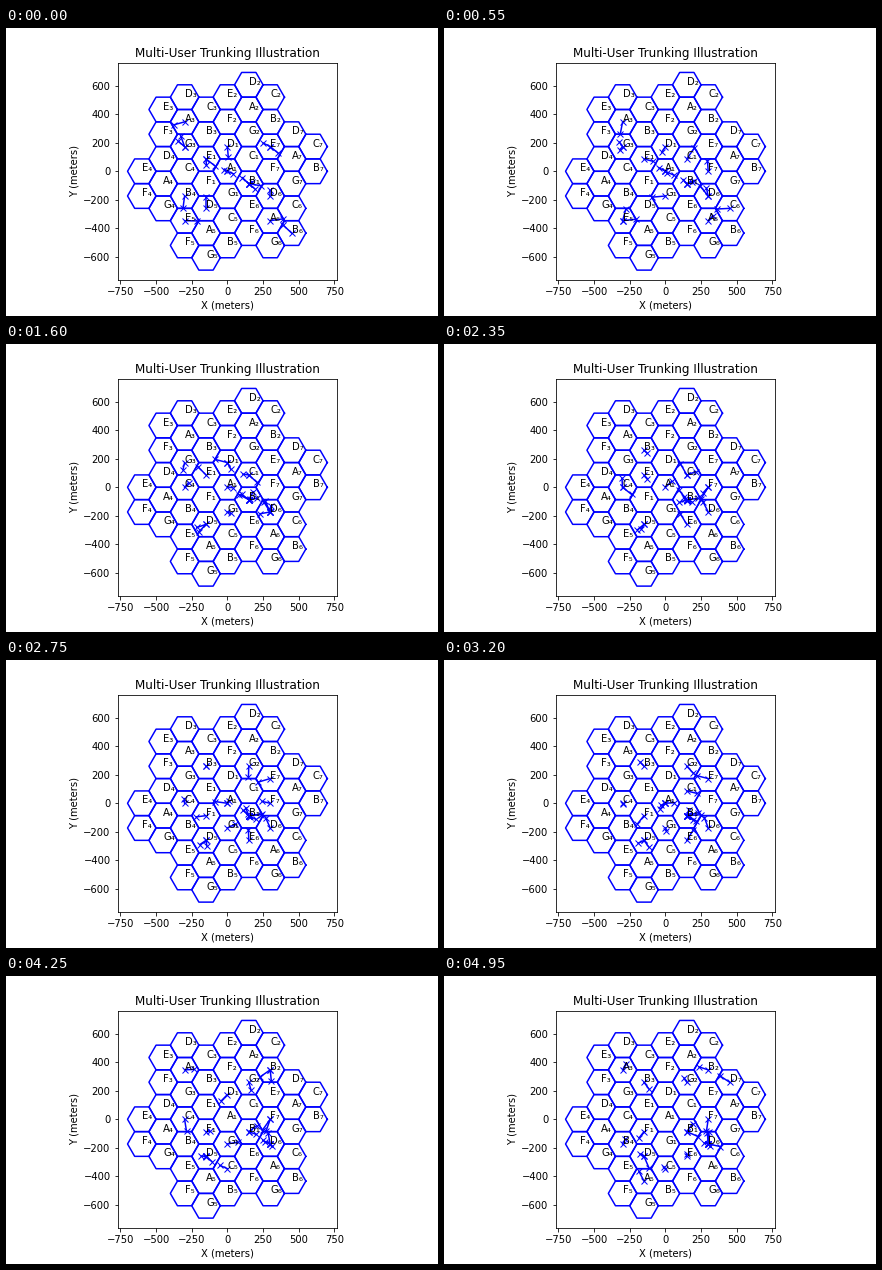
Animation, 432 px wide and 288 px high, one loop 5000 ms. Source, as a matplotlib script:

```python
import numpy as np
import matplotlib.pyplot as plt
from matplotlib.animation import FuncAnimation

FRAMES = 100
RADIUS = 100
SPACING = RADIUS * np.sqrt(3)

# Long straight walks in meters: start x, y and end x, y
WALKS = np.array([
    (-327, 247, -280, -139),
    (387, -334, 130, 290),
    (390, -376, -115, 212),
    (6, 102, -276, 390),
    (193, -124, 236, 367),
    (-147, 41, 383, 304),
    (250, 198, -185, -131),
    (355, 128, -185, -366),
    (-213, -348, -178, -243),
    (-311, -257, -10, -334),
    (-150, -180, 385, -191),
    (-346, 212, -115, -341),
    (-374, 326, 148, -240),
])

plt.rcParams.update({"font.family": "DejaVu Sans", "font.size": 10})
fig, ax = plt.subplots(figsize=(6, 4), dpi=72)
fig.subplots_adjust(left=0.125, right=0.9, bottom=0.125, top=0.88)


def ring(radius, first_angle):
    """Six points around the origin, counter-clockwise from first_angle."""
    angles = np.radians(first_angle + 60 * np.arange(6))
    return radius * np.column_stack([np.cos(angles), np.sin(angles)])


def with_center(points):
    return np.vstack([(0, 0), points])


def draw_cells():
    """Draw seven clusters of seven cells and return the cell centers."""
    # A cluster neighbour lies two cells up and one cell to the upper right
    tilt = np.degrees(np.arctan2(2.5 * SPACING, 1.5 * RADIUS))
    clusters = with_center(ring(SPACING * np.sqrt(7), tilt))
    cells = with_center(ring(SPACING, -30))
    corners = ring(RADIUS, 0)
    outline = np.vstack([corners, corners[:1]])
    centers = []
    for number, cluster in enumerate(clusters, start=1):
        for letter, cell in zip("ABCDEFG", cells):
            center = cluster + cell
            ax.plot(*(center + outline).T, "b-", lw=1.5)
            ax.text(*center, letter + chr(0x2080 + number))
            centers.append(center)
    return np.array(centers)


def make_paths():
    """Add slow users that set out in a row and gather around one spot."""
    count = 20 - len(WALKS)
    rng = np.random.default_rng(4)
    row = np.linspace((-90, 40), (300, -130), count)
    gathered = (206, -94) + rng.uniform(-110, 110, (count, 2))
    return np.vstack([WALKS[:, :2], row]), np.vstack([WALKS[:, 2:], gathered])


stations = draw_cells()
starts, ends = make_paths()
links = [ax.plot([], [], "bx-", lw=1.5, ms=6)[0] for _ in starts]

ax.set_aspect("equal")
ax.set_xlim(-770, 770)
ax.set_ylim(-4.4 * SPACING, 4.4 * SPACING)
ax.set_xticks(range(-750, 751, 250))
ax.set_yticks(range(-600, 601, 200))
ax.set_title("Multi-User Trunking Illustration")
ax.set_xlabel("X (meters)")
ax.set_ylabel("Y (meters)")


def update(frame):
    """Move every user and link it to the nearest station."""
    part = frame / (FRAMES - 1)
    spots = starts + (ends - starts) * part
    for link, spot in zip(links, spots):
        gaps = np.hypot(*(stations - spot).T)
        link.set_data(*zip(stations[gaps.argmin()], spot))
    return links


anim = FuncAnimation(fig, update, frames=FRAMES, interval=50,
                     repeat=True, repeat_delay=0)
plt.show()
```
